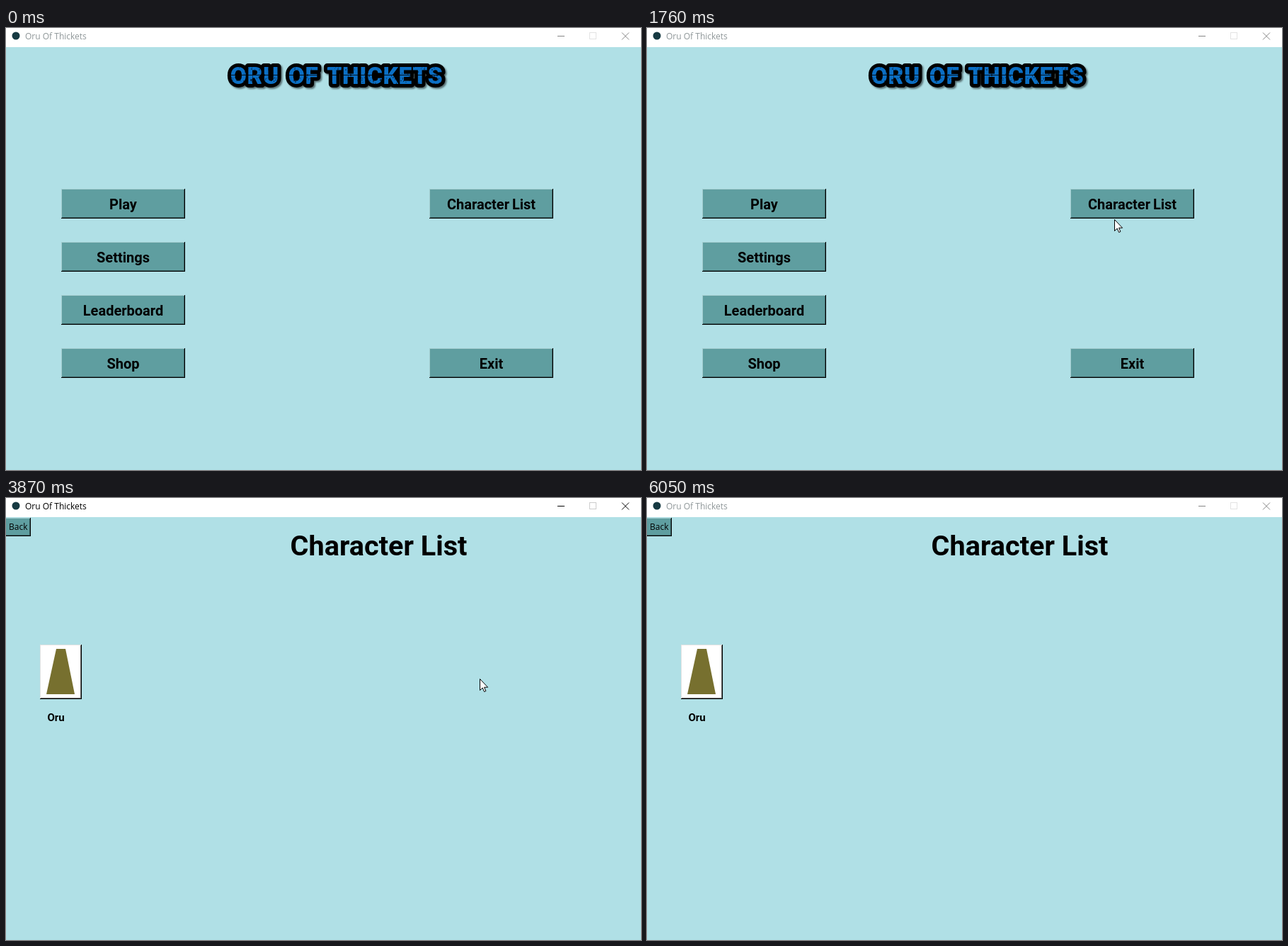
Recreate the animation shown at these times as an HTML page. Size 897x624 px, loop 6130 ms.

```html
<!DOCTYPE html>
<html lang="en">
<head>
<meta charset="utf-8">
<title>Oru Of Thickets</title>
<style>
  html, body { margin: 0; width: 100%; height: 100%; overflow: hidden; background: #b0e0e6; }
  svg { display: block; width: 100%; height: 100%; }
  text { white-space: pre; }
  rect, .crisp { shape-rendering: crispEdges; }
  .ui { font: 12px "Open Sans", "Noto Sans", sans-serif; }
  .din { font-family: Roboto, Inter, sans-serif; font-weight: 700; }
  .logo { font: 900 33.5px Roboto, Inter, sans-serif; letter-spacing: .6px; word-spacing: 4px; }
</style>
</head>
<body>
<svg id="stage" viewBox="0 0 897 624" xmlns="http://www.w3.org/2000/svg">
  <defs>
    <pattern id="paint" width="61" height="40" y="48" patternUnits="userSpaceOnUse">
      <rect width="61" height="40" fill="#0b6fc4"/>
      <g id="grunge"></g>
      <rect y="18" width="61" height="1" fill="#04121f"/>
    </pattern>
    <filter id="soft" x="-5%" y="-30%" width="110%" height="170%">
      <feGaussianBlur stdDeviation="1.2"/>
    </filter>
  </defs>
  <rect width="897" height="624" fill="#b0e0e6"/>
  <rect width="897" height="27" fill="#fff"/>
  <circle cx="14" cy="11" r="5.5" fill="#173a42"/>
  <text id="caption" class="ui" x="27" y="16">Oru Of Thickets</text>
  <g id="controls" fill="none">
    <path class="crisp" d="M779 11.5h10"/>
    <path d="M870 6.5l10 10M880 6.5l-10 10"/>
  </g>
  <rect id="maximize" x="824.5" y="6.5" width="9" height="9" fill="none"/>
  <g id="menu">
    <g class="logo" text-anchor="middle">
      <text x="469" y="81" stroke="#37474a" stroke-width="10" stroke-linejoin="round" opacity=".75" filter="url(#soft)">ORU OF THICKETS</text>
      <text x="467" y="79" stroke="#000" stroke-width="10" stroke-linejoin="round">ORU OF THICKETS</text>
      <text x="467" y="79" fill="url(#paint)">ORU OF THICKETS</text>
    </g>
  </g>
  <g id="list">
    <text class="din" x="526.5" y="81" font-size="39.6" text-anchor="middle">Character List</text>
    <text class="din" x="70.5" y="315" font-size="15" text-anchor="middle">Oru</text>
  </g>
  <circle id="halo" cx="672" cy="257" r="12" fill="#ffee00" fill-opacity=".62"/>
  <path id="cursor" d="M.5 .5V16.5L4.2 13L6.6 18.5L8.9 17.5L6.6 12.2H11.6Z" fill="#fff" stroke="#000" stroke-width="1"/>
</svg>
<script>
const LOOP = 6130, PRESS = 2310, OPEN = 2460, BLUR = 5960, GONE = 5260;
const $ = id => document.getElementById(id);

function add(parent, tag, attrs, text) {
  const el = document.createElementNS("http://www.w3.org/2000/svg", tag);
  for (const key in attrs) el.setAttribute(key, attrs[key]);
  if (text) el.textContent = text;
  parent.appendChild(el);
  return el;
}

// Two-pixel bevelled box: outer and inner edge colours as [light, dark]
function bevel(parent, x, y, w, h, fill, outer, inner) {
  const g = add(parent, "g", {});
  add(g, "rect", { x, y, width: w, height: h, fill });
  [outer, inner].forEach(([light, dark], i) => {
    const l = x + i, t = y + i, r = x + w - 1 - i, b = y + h - 1 - i;
    const edge = (ex, ey, width, height, color) =>
      add(g, "rect", { x: ex, y: ey, width, height, fill: color });
    edge(l, t, r - l, 1, light);
    edge(l, t, 1, b - t, light);
    edge(l, b, r - l + 1, 1, dark);
    edge(r, t, 1, b - t, dark);
  });
  return g;
}

const TEAL = "#5f9ea0";
const raised = (parent, x, y, w, h) =>
  bevel(parent, x, y, w, h, TEAL, ["#a3cdcf", "#000"], [TEAL, "#395f60"]);

function label(g, x, y, text) {
  add(g, "text", { class: "din", x, y, "font-size": 20, "text-anchor": "middle", "word-spacing": -1 }, text);
}

function menuButton(x, y, text) {
  const g = raised($("menu"), x, y, 175, 42);
  label(g, x + 87.5, y + 29, text);
  return g;
}

["Play", "Settings", "Leaderboard", "Shop"].forEach((text, i) => menuButton(78, 227 + 75 * i, text));
menuButton(598, 452, "Exit");
const idle = menuButton(598, 227, "Character List");
const pressed = bevel($("menu"), 598, 227, 175, 42, "#f0f0f0", ["#a0a0a0", "#fff"], ["#696969", "#e3e3e3"]);
label(pressed, 686.5, 257, "Character List");

const back = raised($("list"), -1, 28, 36, 26);
add(back, "text", { class: "ui", x: 4, y: 45 }, "Back");
const card = bevel($("list"), 48, 207, 59, 77, "#fff", ["#e3e3e3", "#000"], ["#fff", "#696969"]);
add(card, "path", { d: "M71 213H84L97 277H57Z", fill: "#77702f" });

let seed = 7;
const random = () => (seed = seed * 16807 % 2147483647) / 2147483647;
for (let i = 0; i < 70; i++) {
  add($("grunge"), "rect", {
    x: random() * 60, y: random() * 38, width: 1 + random(), height: 1 + random() * 2,
    fill: "#062a4d", opacity: .4 + random() * .5
  });
}

// Pointer strokes: start, end, number of steps, waypoints
const moves = [
  [920, 1530, 9, [[478, 606], [470, 480], [480, 384], [541, 331], [625, 311]]],
  [1610, 1910, 5, [[640, 297], [660, 270], [671, 257]]],
  [OPEN, OPEN, 1, [[670, 256]]],
  [3870, 4420, 8, [[669, 255], [610, 222], [460, 182], [382, 168]]],
  [4490, 4650, 3, [[372, 196], [364, 230], [363, 266]]],
  [4720, 5030, 5, [[374, 309], [465, 398], [608, 461]]],
  [5110, 5190, 2, [[672, 526], [742, 606]]]
];

function spline(pts, u) {
  const last = pts.length - 1;
  const i = Math.min(Math.floor(u * last), Math.max(last - 1, 0));
  const f = u * last - i;
  const at = k => pts[Math.max(0, Math.min(last, k))];
  return [0, 1].map(axis => {
    const [a, b, c, d] = [-1, 0, 1, 2].map(k => at(i + k)[axis]);
    return Math.round(b + f / 2 * (c - a + f * (2 * a - 5 * b + 4 * c - d + f * (3 * (b - c) + d - a))));
  });
}

function pointer(t) {
  const move = moves.filter(m => m[0] <= t).pop();
  if (!move || t >= GONE) return null;
  const [start, end, steps, pts] = move;
  if (steps === 1) return pts[0];
  const gap = (end - start) / (steps - 1);
  const step = Math.min(steps - 1, Math.floor((t - start + 4) / gap));
  return spline(pts, step / (steps - 1));
}

const show = (el, on) => el.setAttribute("visibility", on ? "inherit" : "hidden");

function draw(t) {
  const active = t >= PRESS && t < BLUR;
  const down = t >= PRESS && t < OPEN;
  show($("menu"), t < OPEN);
  show($("list"), t >= OPEN);
  show(idle, !down);
  show(pressed, down);
  show($("halo"), down);
  $("caption").setAttribute("fill", active ? "#000" : "#8f9799");
  $("controls").setAttribute("stroke", active ? "#000" : "#858585");
  $("maximize").setAttribute("stroke", active ? "#ccc" : "#e3e3e3");
  const spot = pointer(t);
  show($("cursor"), spot);
  if (spot) $("cursor").setAttribute("transform", `translate(${spot})`);
}

const origin = performance.now();
function tick() {
  draw((performance.now() - origin) % LOOP);
  requestAnimationFrame(tick);
}
tick();
</script>
</body>
</html>
```
